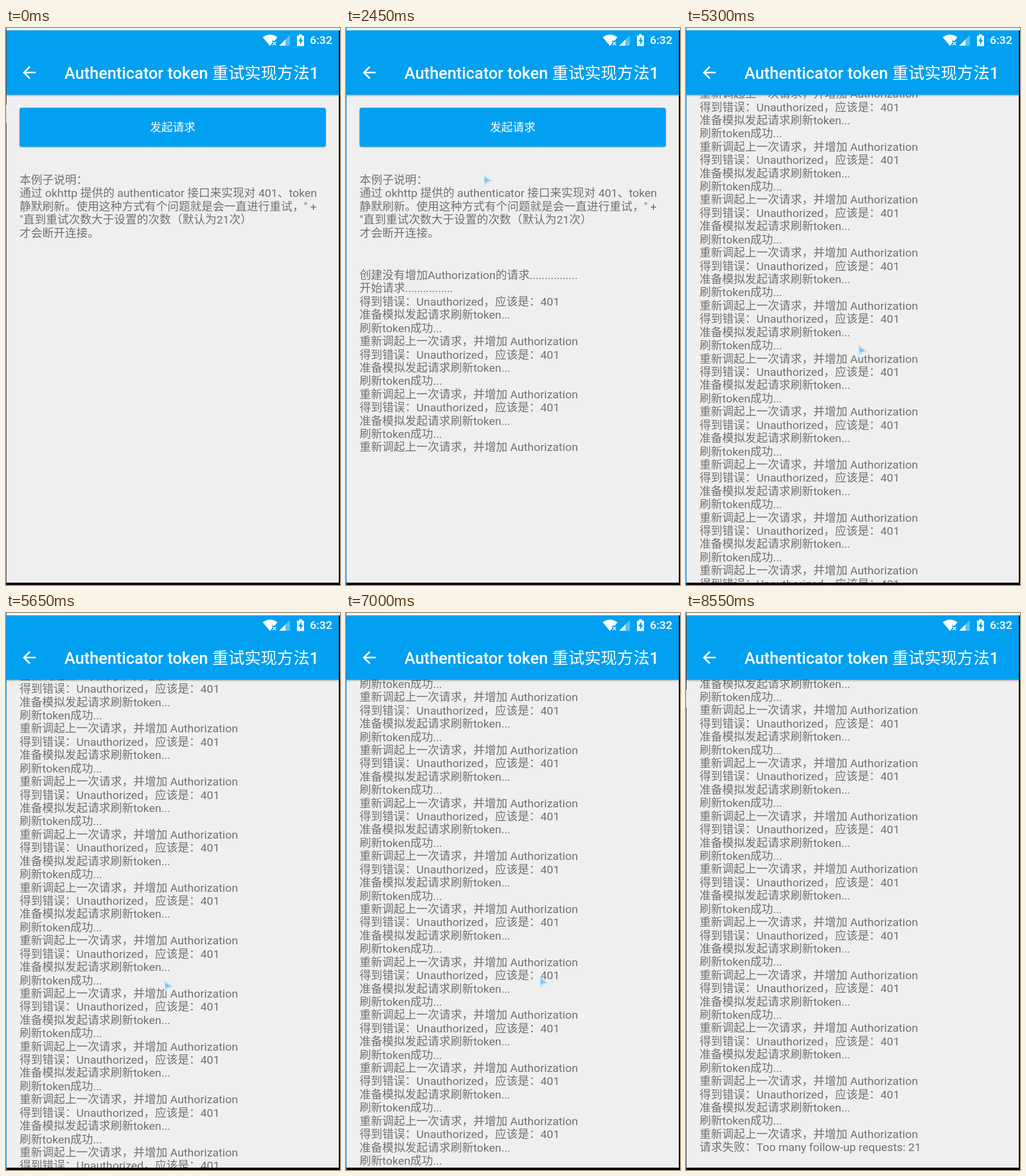
These frames come from a looping animation (566x943 px, 9350 ms). An HTML page:

```html
<!DOCTYPE html>
<html lang="zh-CN">
<head>
<meta charset="utf-8">
<style>
  html, body { margin: 0; width: 100%; height: 100%; overflow: hidden; background: #000; }
  #stage {
    position: absolute; left: 0; top: 0; width: 566px; height: 943px; overflow: hidden; background: #000;
    font: 19.28px/22.42px Roboto, "Noto Sans CJK SC", "Noto Sans CJK", sans-serif;
  }
  #stage div, #stage svg { position: absolute; }
  #strip { left: 0; top: 0; width: 566px; height: 4px; background: #eef6fa; }
  #edge { left: 0; top: 0; width: 1px; height: 943px;
    background: linear-gradient(#3c3f41 130px, #d8d8d8 130px 160px, #4a4c4e 160px); }
  #edge.focused { background: #1b8fe0; }
  #view { left: 1px; top: 113px; width: 563px; height: 826px; overflow: hidden; background: #efefef; }
  #page { left: -1px; top: -113px; width: 566px; color: #717171; white-space: pre; }
  #button {
    left: 23px; top: 135px; width: 519px; height: 66px; border-radius: 4px;
    background: #01a0f1; color: #fff; line-height: 67px; text-align: center;
    box-shadow: 0 0 1px rgba(0,0,0,.3), 0 1px 2px rgba(0,0,0,.3);
  }
  #ripple { inset: 0; border-radius: 4px; background: #000; }
  #intro { left: 23px; top: 247px; }
  #log { left: 23px; top: 408px; }
  #bar { left: 1px; top: 4px; width: 563px; height: 109px; background: #01a0f1; box-shadow: 0 1px 3px rgba(0,0,0,.4); }
  #title { left: 99px; top: 60.5px; font-size: 27.55px; line-height: 32px; font-weight: 500; color: #fff; white-space: pre; }
  #title span { font-weight: 400; }
  #clock { left: 515px; top: 10.2px; font-weight: 500; color: #fff; }
  #icons, #cursor { left: 0; top: 0; overflow: visible; }
</style>
</head>
<body>
<div id="stage">
  <div id="view">
    <div id="page">
      <div id="button">发起请求<div id="ripple"></div></div>
      <div id="intro">本例子说明：
通过 okhttp 提供的 authenticator 接口来实现对 401、token
静默刷新。使用这种方式有个问题就是会一直进行重试，" +
"直到重试次数大于设置的次数（默认为21次）
才会断开连接。</div>
      <div id="log"></div>
    </div>
  </div>
  <div id="bar"></div>
  <div id="strip"></div>
  <div id="edge"></div>
  <svg id="icons" width="566" height="113" fill="#fff">
    <path transform="translate(23 59) scale(1.371)" d="M20 11H7.83l5.59-5.59L12 4l-8 8 8 8 1.41-1.41L7.83 13H20z"/>
    <path d="M435 15.5Q447.5 7 460 15.5L455.5 21.5H451V26L447.3 30.5Z"/>
    <path d="M452 23.5l5.5 5.5m0-5.5l-5.5 5.5" stroke="#fff" stroke-width="1.5"/>
    <path d="M463 30L481 12V30Z" opacity=".35"/>
    <path d="M463 30L473.5 19.5V30Z"/>
    <path d="M493 13h3.5v-2.5h5V13h3.5v17.5h-12z"/>
    <path d="M500.5 14.5l-5 8h3v6l5-8h-3z" fill="#01a0f1"/>
  </svg>
  <div id="title">Authenticator token <span>重试实现方法</span>1</div>
  <div id="clock">6:32</div>
  <svg id="cursor" width="20" height="24">
    <path d="M1 1L16 12.5L9.5 14L2 20.5Z" fill="#b4dcf7" stroke="#d6ecf9" stroke-width="1.5" stroke-linejoin="round"/>
    <path d="M3 6V14L12 12Z" fill="#84c2ef"/>
  </svg>
</div>
<script>
const LOOP = 9350, STEP = 50;
const $ = id => document.getElementById(id);

const cycle = [
  '得到错误：Unauthorized，应该是：401',
  '准备模拟发起请求刷新token...',
  '刷新token成功...',
  '重新调起上一次请求，并增加 Authorization'
];
const lines = [
  '创建没有增加Authorization的请求................',
  '开始请求................',
  ...Array(21).fill(cycle).flat(),
  '请求失败：Too many follow-up requests: 21'
];

// Key poses: [time, ...values]
const logKeys = [[1400, 0], [1700, 6], [2450, 14], [2500, 18], [3950, 22], [7800, lines.length]];
const scrollKeys = [[4310, 0], [5300, 419], [6100, 653.7], [6800, 926.3], [7000, 926.3], [8300, 1441.6]];
const cursorKeys = [[200, 212, 126], [400, 134, 95], [600, 204, 144], [1850, 204, 144], [2200, 232, 247],
  [3000, 232, 247], [4200, 305, 712], [4500, 303, 661], [5300, 291, 535], [6100, 232, 745],
  [7000, 327, 614], [8300, 455, 600]];

const clamp = k => Math.min(1, Math.max(0, k));
const linear = k => k;
const smooth = k => k * k * (3 - 2 * k);

function pose(keys, t, ease) {
  const end = Math.max(1, keys.findIndex(key => key[0] > t));
  const [a, b] = t >= keys.at(-1)[0] ? keys.slice(-2) : [keys[end - 1], keys[end]];
  const k = ease(clamp((t - a[0]) / (b[0] - a[0])));
  return a.slice(1).map((v, i) => v + (b[i + 1] - v) * k);
}

let shown = -1;
function draw(now) {
  const t = Math.floor(now % LOOP / STEP) * STEP;
  const count = Math.floor(pose(logKeys, t, linear)[0] + 1e-6);
  if (count !== shown) {
    $('log').textContent = lines.slice(0, count).join('\n');
    shown = count;
  }
  const [scroll] = pose(scrollKeys, t, smooth);
  const [x, y] = pose(cursorKeys, t, smooth);
  $('page').style.transform = `translateY(${-scroll}px)`;
  $('cursor').style.transform = `translate(${x}px, ${y}px)`;
  $('cursor').style.display = t >= 50 && t < 8550 ? '' : 'none';
  $('ripple').style.opacity = t < 1300 ? 0 : .12 * clamp((1700 - t) / 300);
  $('edge').className = t >= 850 && t < 8500 ? 'focused' : '';
}

function tick() {
  draw(performance.now());
  requestAnimationFrame(tick);
}
tick();
</script>
</body>
</html>
```
